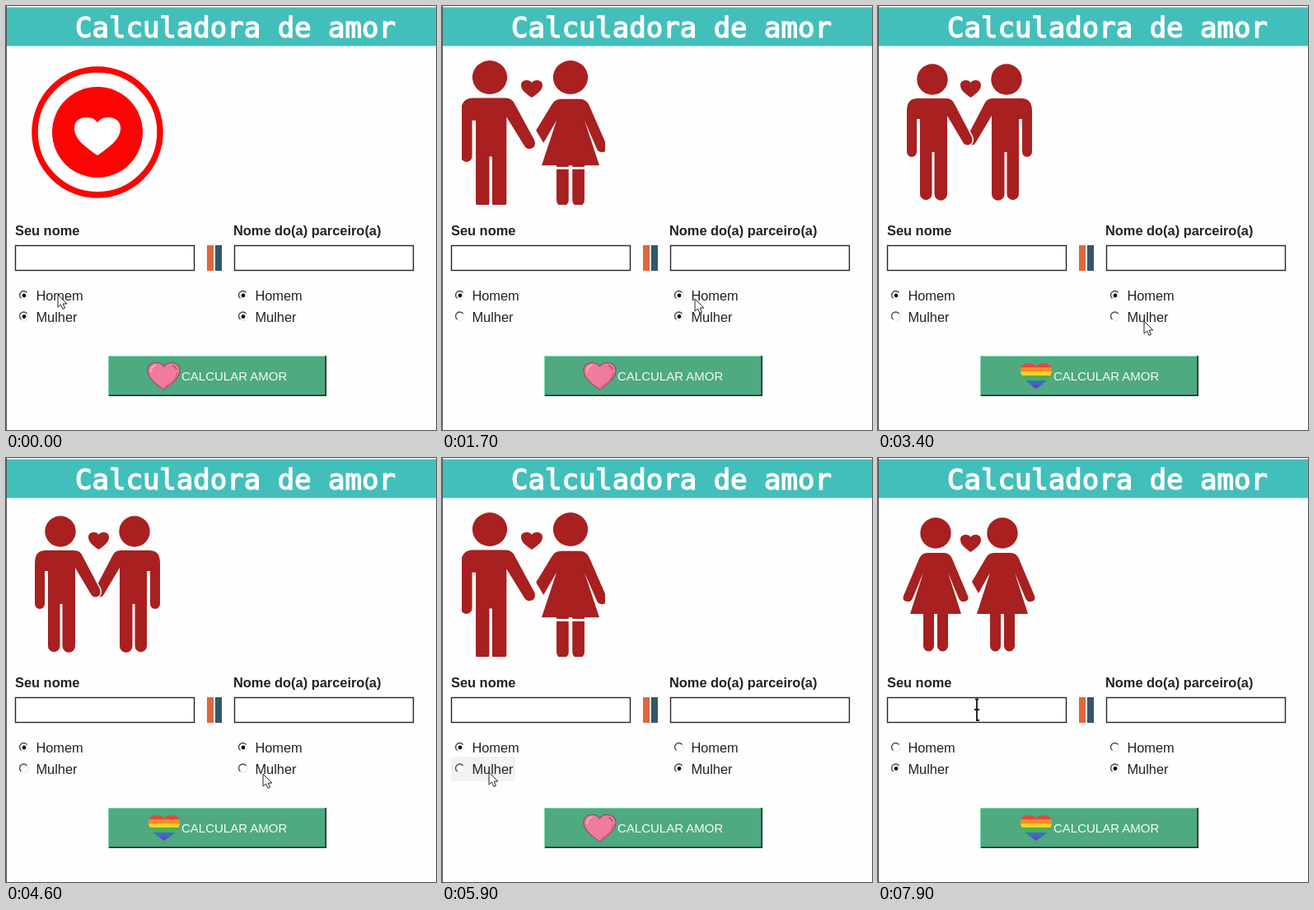
An HTML page that plays this animation: 522x514 px, repeating every 8 s.

```html
<!DOCTYPE html>
<html lang="pt">
<head>
<meta charset="utf-8">
<title>Calculadora de amor</title>
<style>
  html, body { margin: 0; width: 522px; height: 514px; overflow: hidden; background: #fefefe; }
  svg { display: block; }
  text { font: 16.4px "Liberation Sans", Arial, sans-serif; fill: #222; }
  .title { font: 34px "DejaVu Sans Mono", monospace; fill: #fff; stroke: #fff; stroke-width: 1.4; }
  .label { font-weight: bold; }
  .action { font-size: 15px; fill: #f2fbf6; }
  .field { fill: #fff; stroke: #262626; stroke-width: 1.4; }
  .person { fill: #a82020; stroke: #fefefe; stroke-width: 3; paint-order: stroke; }
  .red { fill: #a82020; }
</style>
</head>
<body>
<svg width="522" height="514" viewBox="0 0 522 514">
  <defs>
    <path id="heart" d="M50 100C20 75 0 55 0 28C0 10 12 0 26 0C38 0 46 6 50 14C54 6 62 0 74 0C88 0 100 10 100 28C100 55 80 75 50 100Z"/>
    <g id="man">
      <circle r="18.7"/>
      <path d="M-18 23H17Q24 23 27 30L48 70Q50 77 45 79Q40 81 37 76L18 44V139A7 7 0 0 1 2.5 139V88H-.5V139A7 7 0 0 1 -15 139V48H-19V88A6 6 0 0 1 -31 88V38Q-31 23 -18 23Z"/>
    </g>
    <g id="woman">
      <circle r="18.7"/>
      <path d="M-10 24H10Q17 24 20 31L39 76Q41 82 35 83Q30 84 28 79L15 48L31 98H15V137A6.5 6.5 0 0 1 2 137V98H-2V137A6.5 6.5 0 0 1 -15 137V98H-31L-15 48L-28 79Q-30 84 -35 83Q-41 82 -39 76L-20 31Q-17 24 -10 24Z"/>
    </g>
    <!-- left arm reaches behind the other person's hand -->
    <g id="partner">
      <circle r="18.7"/>
      <path d="M-10 24H10Q17 24 20 31L39 76Q41 82 35 83Q30 84 28 79L15 48L31 98H15V137A6.5 6.5 0 0 1 2 137V98H-2V137A6.5 6.5 0 0 1 -15 137V98H-31L-15 48L-29 73L-37 59L-20 30Q-17 24 -10 24Z"/>
    </g>
    <clipPath id="crop"><rect x="24" y="65" width="174" height="176"/></clipPath>
    <linearGradient id="rainbow" x2="0" y2="1"></linearGradient>
    <radialGradient id="press">
      <stop offset="0" stop-color="#e8606a" stop-opacity=".3"/>
      <stop offset="1" stop-color="#dc4650" stop-opacity=".55"/>
    </radialGradient>
  </defs>

  <rect x="1" y="1.5" width="521" height="47" fill="#42bfbb"/>
  <rect width="1" height="514" fill="#555"/>
  <text class="title" x="84" y="37.5">Calculadora de amor</text>

  <g id="badge">
    <circle cx="111" cy="153" r="76" fill="#fff" stroke="#fb0404" stroke-width="7.5"/>
    <circle cx="111" cy="153" r="55" fill="#fb0404"/>
    <use href="#heart" transform="translate(83 135) scale(.56 .46)" fill="#fff"/>
  </g>
  <g id="couple" clip-path="url(#crop)">
    <use href="#partner" class="person" transform="translate(156 86.5) scale(1.13 1.09)"/>
    <rect x="120" y="195" width="72" height="3" fill="#fefefe"/>
    <use href="#man" class="person" transform="translate(58 86.5) scale(1.13 1.09)"/>
    <use href="#heart" class="red" transform="translate(96 90) scale(.26 .21)"/>
  </g>
  <g id="men">
    <use href="#man" class="person" transform="translate(156 89) scale(-1 1)"/>
    <use href="#man" class="person" transform="translate(66 89)"/>
    <use href="#heart" class="red" transform="translate(100 90) scale(.25 .21)"/>
  </g>
  <g id="women">
    <use href="#partner" class="person" transform="translate(151 91)"/>
    <use href="#woman" class="person" transform="translate(70 91)"/>
    <use href="#heart" class="red" transform="translate(100 93) scale(.25 .21)"/>
  </g>

  <text class="label" x="11" y="278">Seu nome</text>
  <text class="label" x="276" y="278">Nome do(a) parceiro(a)</text>
  <rect class="field" x="11.5" y="290.5" width="217" height="30"/>
  <rect class="field" x="277.5" y="290.5" width="217" height="30"/>
  <rect x="244" y="290" width="8" height="31" fill="#e0663c"/>
  <rect x="254" y="290" width="8" height="31" fill="#34566b"/>

  <rect id="hover" x="11" y="362" width="78" height="30" rx="3" fill="#f1f2f3"/>
  <g id="options"></g>

  <rect x="124" y="424" width="265" height="49" fill="#4fa981"/>
  <path d="M124.5 473V424.5H389" fill="none" stroke="#7fdcb4"/>
  <path d="M125 472.2H388.2V424" fill="none" stroke="#1f4032" stroke-width="1.8"/>
  <g id="pink">
    <use href="#heart" transform="translate(172 432.5) scale(.39 .325)" fill="#ef7b9e" stroke="#86495b" stroke-width="2.6"/>
    <path d="M176 444Q176 437 182 435" fill="none" stroke="#f8a9c0" stroke-width="2"/>
    <path d="M208 444Q207 455 193 462" fill="none" stroke="#d95f86" stroke-width="2"/>
    <path d="M202 436Q206 437 207 441" fill="none" stroke="#86495b" stroke-width="1.2"/>
  </g>
  <use id="pride" href="#heart" transform="translate(173 433) scale(.38 .31)" fill="url(#rainbow)"/>
  <text class="action" x="213" y="454">CALCULAR AMOR</text>

  <circle id="click" r="12" fill="url(#press)"/>
  <path id="arrow" d="M0 0V15L3.5 12L6 17.3L8.5 16.2L6.2 11H10.8Z" fill="#fff" stroke="#222"/>
  <path id="beam" d="M0 -13V13M-2 -12.5H2M-1 13H3M-3 0H3" fill="none" stroke="#111" stroke-width="1.8"/>
</svg>
<script>
const LOOP = 8000, TICK = 100;
const $ = id => document.getElementById(id);

// start time, picture, left choice, right choice, rainbow heart
const states = [
  [0, 'badge', 'HM', 'HM', false],
  [800, 'couple', 'H', 'HM', false],
  [2500, 'men', 'H', 'H', true],
  [4800, 'couple', 'H', 'M', false],
  [6100, 'women', 'M', 'M', true]
];

// time, pointer x, pointer y
const track = [
  [0, 63, 350], [600, 63, 350], [700, 60, 352], [1000, 60, 352],
  [1200, 150, 357], [1400, 272, 358], [1700, 307, 355], [1900, 309, 362],
  [3200, 309, 363], [3400, 323, 382], [4500, 323, 382], [4700, 301, 384],
  [5000, 301, 384], [5400, 62, 382], [5700, 62, 382], [5900, 57, 381],
  [6300, 57, 381], [6500, 102, 326], [6600, 120, 323], [6800, 120, 311],
  [7300, 120, 305], [8000, 120, 305]
];
const clicks = [[700, 900], [2400, 2600], [4700, 5000], [6000, 6200]];

const stripes = ['#e8453c', '#f58a24', '#f4d02a', '#4cae50', '#3270d2', '#6d45ae'];
$('rainbow').innerHTML = stripes.map((c, i) =>
  [i, i + 1].map(k => `<stop offset="${k / 6}" stop-color="${c}"/>`).join('')).join('');

const radio = (x, y, word, id) => `
  <circle cx="${x}" cy="${y}" r="5" fill="#fff" stroke="#ddd" stroke-width=".8"/>
  <path d="M${x - 3.5} ${y + 3.5}A5 5 0 1 1 ${x + 3.5} ${y - 3.5}" fill="none" stroke="#4a4a4a" stroke-width="1.3"/>
  <circle id="${id}" cx="${x}" cy="${y}" r="2.4" fill="#111"/>
  <text x="${x + 14.4}" y="${y + 6}">${word}</text>`;
$('options').innerHTML = [['L', 22], ['R', 288]].map(([side, x]) =>
  radio(x, 351, 'Homem', side + 'H') + radio(x, 376.5, 'Mulher', side + 'M')).join('');

const show = (id, on) => { $(id).style.display = on ? '' : 'none'; };
const within = (t, [from, to]) => t >= from && t < to;

function pointer(t) {
  const i = Math.max(1, track.findIndex(p => p[0] >= t));
  const [t0, x0, y0] = track[i - 1], [t1, x1, y1] = track[i];
  const k = (t - t0) / (t1 - t0);
  return [x0 + (x1 - x0) * k, y0 + (y1 - y0) * k];
}

function draw(t) {
  const [, picture, left, right, pride] = states.filter(s => s[0] <= t).pop();
  for (const id of ['badge', 'couple', 'men', 'women']) show(id, id === picture);
  for (const sex of 'HM') {
    show('L' + sex, left.includes(sex));
    show('R' + sex, right.includes(sex));
  }
  show('pride', pride);
  show('pink', !pride);
  show('hover', within(t, [5800, 6200]));

  const at = `translate(${pointer(t)})`;
  const typing = t >= 6800;
  for (const id of ['arrow', 'beam', 'click']) $(id).setAttribute('transform', at);
  show('arrow', !typing);
  show('beam', typing);
  show('click', clicks.some(c => within(t, c)));
}

const start = performance.now();
function frame() {
  const t = (performance.now() - start) % LOOP;
  draw(Math.floor(t / TICK) * TICK);
  requestAnimationFrame(frame);
}
frame();
</script>
</body>
</html>
```
